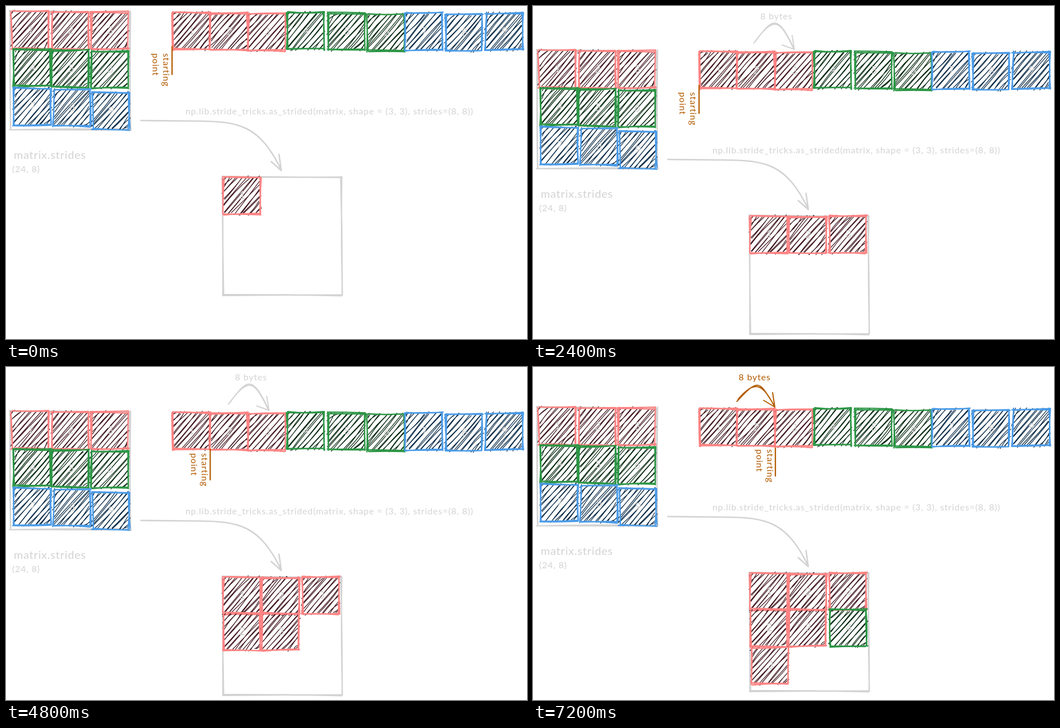
Write an HTML page that moves like this. It is 935 px wide and 599 px high and loops after 8000 ms.

```html
<!DOCTYPE html>
<html lang="en">
<head>
<meta charset="utf-8">
<title>Strides</title>
<style>
  html, body { margin: 0; width: 100%; height: 100%; overflow: hidden; background: #fff; }
  svg { display: block; width: 935px; height: 599px; }
  path { fill: none; stroke-linecap: round; stroke-linejoin: round; }
  text { font-family: Lato, sans-serif; font-size: 16px; letter-spacing: .055em; white-space: pre; }
  .num { font-size: 19px; letter-spacing: 0; text-anchor: middle; }
  .big { font-size: 20px; letter-spacing: .04em; }
</style>
</head>
<body>
<svg id="stage" viewBox="0 0 935 599"></svg>
<script>
const GRAY = '#d3d3d3', ORANGE = '#b35c00';
const INK = {
  red: ['#ff8383', '#421a20'],
  green: ['#2b9645', '#06290f'],
  blue: ['#4a9be8', '#0a2b47']
};
const LOOP = 8000, STEP = 1200, CELL = 66;

const svg = document.getElementById('stage');

function add(parent, tag, attrs = {}, content = '') {
  const el = document.createElementNS('http://www.w3.org/2000/svg', tag);
  for (const key in attrs) el.setAttribute(key, attrs[key]);
  el.textContent = content;
  return parent.appendChild(el);
}
const group = parent => add(parent, 'g');
const stroke = (parent, d, color, width = 2.3) =>
  add(parent, 'path', { d, stroke: color, 'stroke-width': width });
const label = (parent, x, y, str, fill, extra = {}) =>
  add(parent, 'text', { x, y, fill, ...extra }, str);

let seed = 1;
const random = () => (seed = seed * 16807 % 2147483647) / 2147483647;
const jitter = r => (random() * 2 - 1) * r;

// One hand-drawn line, slightly bowed
function rough(x1, y1, x2, y2, r) {
  const at = (x, y) => `${(x + jitter(r)).toFixed(1)} ${(y + jitter(r)).toFixed(1)}`;
  return `M${at(x1, y1)}Q${at((x1 + x2) / 2, (y1 + y2) / 2)} ${at(x2, y2)}`;
}

function outline(x, y, w, h, r) {
  const corners = [[x, y], [x + w, y], [x + w, y + h], [x, y + h]];
  let d = '';
  for (let i = 0; i < 8; i++) d += rough(...corners[i % 4], ...corners[(i + 1) % 4], r);
  return d;
}

function hatch(x, y, w, h) {
  const s = Math.sin(49 * Math.PI / 180), c = Math.cos(49 * Math.PI / 180);
  let d = '';
  for (let k = 3; k < w * s + h * c; k += 7.6) {
    const low = k / c <= h ? [0, k / c] : [(k - h * c) / s, h];
    const high = k / s <= w ? [k / s, 0] : [w, (k - w * s) / c];
    for (let pass = 0; pass < 2; pass++)
      d += rough(x + low[0], y + low[1], x + high[0], y + high[1], 2.7);
  }
  return d;
}

function cell(parent, x, y, n) {
  const [edge, fill] = INK[n < 4 ? 'red' : n < 7 ? 'green' : 'blue'];
  const g = group(parent);
  seed = 7919 * n + 31 * x + 17 * y;
  stroke(g, hatch(x, y, CELL, CELL), fill, 1.25);
  stroke(g, outline(x, y, CELL, CELL, 2), edge, 2.4);
  label(g, x + CELL / 2 + 1, y + CELL / 2 + 6, n, GRAY, { class: 'num' });
  return g;
}

const page = group(svg);

// Source matrix and its memory layout
seed = 77;
stroke(page, outline(8, 10, 215, 212, 2), GRAY);
[[10, 10], [82, 11], [153, 11], [14, 78], [83, 80], [153, 81], [14, 148], [85, 150], [155, 156]]
  .forEach(([x, y], i) => cell(page, x, y, i + 1));
[[299, 12], [367, 13], [435, 14], [504, 12], [578, 13], [649, 15], [717, 13], [789, 15], [861, 13]]
  .forEach(([x, y], i) => cell(page, x, y, i + 1));

label(page, 14, 275, 'matrix.strides', GRAY, { class: 'big' });
label(page, 11, 299, '(24, 8)', GRAY);
label(page, 322, 195, 'np.lib.stride_tricks.as_strided(matrix, shape = (3, 3), strides=(8, 8))', GRAY);
stroke(page, 'M242 206L340 207C420 207 455 215 494 295M476 280L494 296L490 267', GRAY, 2.6);

// Resulting view
seed = 99;
stroke(page, outline(389, 308, 213, 212, 1.8), GRAY);
const view = [[390, 308, 1], [460, 309, 2], [532, 308, 3], [390, 373, 2], [460, 373, 3], [533, 374, 4], [392, 441, 3]]
  .map(args => cell(page, ...args));

// Starting point marker for each row
const markers = [0, 1, 2].map(row => {
  const g = group(page), dx = 69 * row;
  stroke(g, `M${298 + 68.5 * row} ${73 + 5 * row}V${row ? 133 : 123}`, ORANGE, 2.3);
  for (const [x, str] of [[282, 'starting'], [263, 'point']])
    label(g, 0, 0, str, ORANGE, { transform: `translate(${x + dx} 85) rotate(90)` });
  return g;
});

// Jump arrow from x, either within a row (wide) or to the next row
function hop(x, next) {
  const g = group(svg), color = next ? ORANGE : GRAY;
  const arc = next
    ? 'M0 62C40 18 40 26 68 71M2 58C33 22 46 30 68 72M48 60L68 72L64 46'
    : 'M0 67C38 16 46 24 72 77M2 65C35 20 43 14 73 78M51 70L73 78L69 53';
  add(g, 'path', { d: arc, stroke: color, 'stroke-width': 2, transform: `translate(${x} 0)` });
  label(g, x + (next ? 3 : 12), 24, '8 bytes', color);
  return g;
}
const hops = [null, hop(322), hop(396), hop(297, true), hop(399), hop(464), hop(366, true)];
const shift = [0, 70, 70, 55, 70, 70, 63];

const show = (el, on) => el && el.setAttribute('visibility', on ? 'visible' : 'hidden');
let current = -1;

function draw(now) {
  const step = Math.floor(now % LOOP / STEP);
  if (step !== current) {
    current = step;
    page.setAttribute('transform', `translate(0 ${shift[step]})`);
    view.forEach((el, i) => show(el, i <= step));
    markers.forEach((el, i) => show(el, i === Math.floor(step / 3)));
    hops.forEach((el, i) => show(el, i === step));
  }
}

const start = performance.now();
function tick() {
  draw(performance.now() - start);
  requestAnimationFrame(tick);
}
tick();
</script>
</body>
</html>
```
